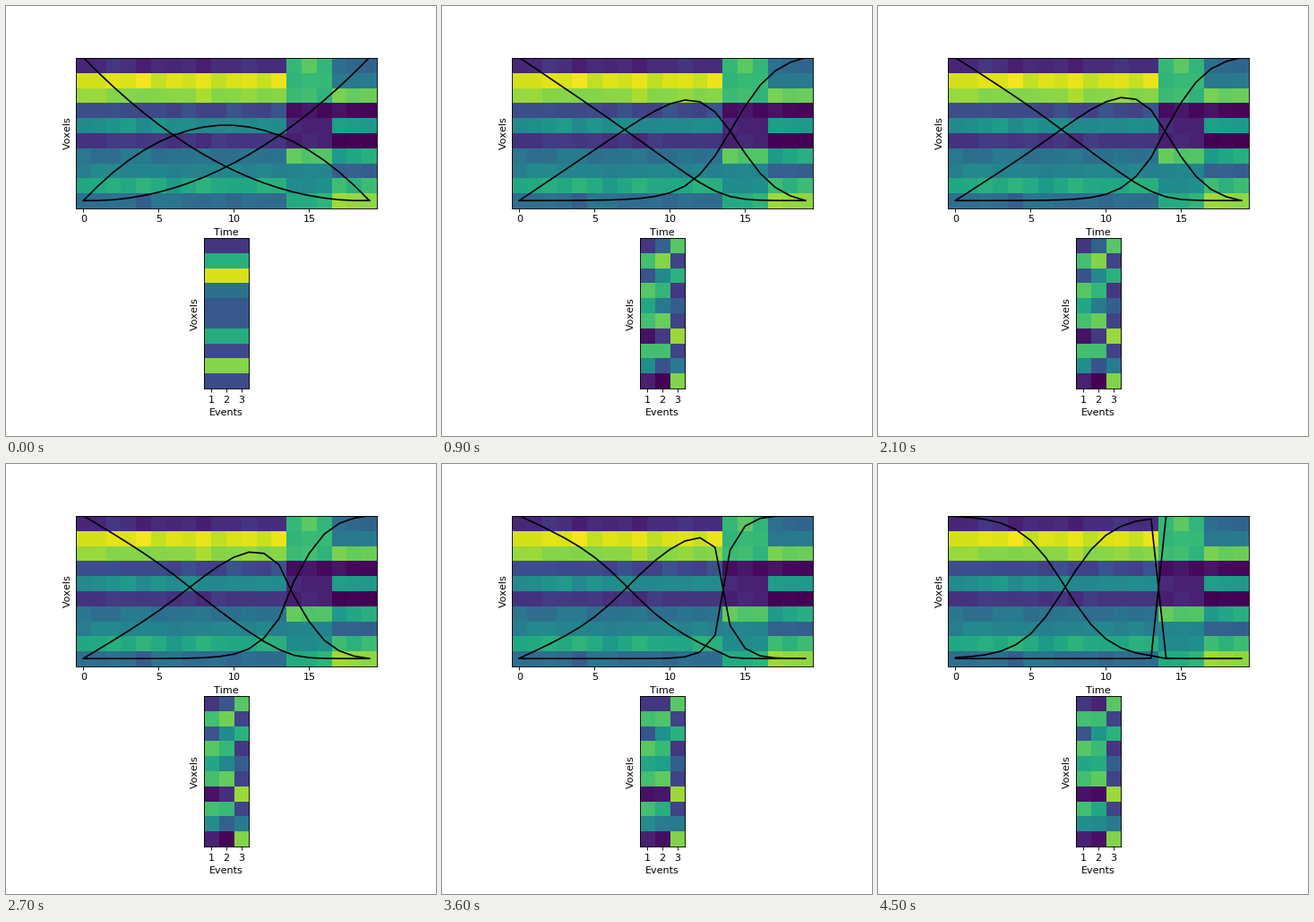
A matplotlib script that plays this animation: 480x480 px, repeating every 5400 ms.

```python
import numpy as np
import matplotlib.pyplot as plt
from matplotlib.animation import FuncAnimation

STEPS = 16          # fitting steps, the last one is held
FRAMES = 18
N_T, N_V = 20, 10
LENGTHS = [14, 3, 3]

# Mean colour level of each voxel in the three stretches of time
MEANS = np.array([
    [.12, .95, .83, .22, .50, .15, .36, .45, .61, .36],
    [.70, .65, .68, .04, .09, .09, .75, .45, .47, .63],
    [.34, .42, .77, .06, .54, .00, .60, .31, .67, .83]])

# Event patterns; the second one changes while the fit settles
START = np.array([.16, .63, .94, .37, .27, .28, .62, .22, .82, .23])
FIRST = np.array([.16, .70, .26, .74, .60, .70, .05, .70, .49, .09])
SECOND = np.array([.32, .82, .47, .66, .40, .77, .17, .70, .25, .00])
SECOND_END = np.array([.10, .69, .53, .68, .62, .75, .03, .60, .48, .05])

time = np.arange(N_T)


def sigmoid(x):
    return 1 / (1 + np.exp(-x))


def smoothstep(x, start, end):
    x = np.clip((x - start) / (end - start), 0, 1)
    return x * x * (3 - 2 * x)


def make_data():
    rng = np.random.default_rng(4)
    data = np.repeat(MEANS.T, LENGTHS, axis=1)
    return np.clip(data + rng.normal(0, .022, data.shape), 0, 1)


def even_odds():
    """First and third event when all pairs of bounds are equally likely."""
    last = N_T - 1
    pairs = last * (last - 1)
    return np.array([(last - time) * (last - 1 - time),
                     time * (time - 1)]) / pairs


def fitted(step):
    """First and third event once the patterns have formed."""
    # The last bound sharpens and locks on to the jump in the data
    steep = .7 + .4 * 3 ** ((step - 11) / 2)
    jump = LENGTHS[0] - .5
    centre = jump + .7 * (.7 / steep) ** 2
    third = sigmoid(steep * (time - centre)
                    + (steep - .7) * np.sign(time - jump))
    third /= third[-1]

    # The first bound goes from a rounded ramp to an S-curve
    ramp = .08 * np.logaddexp(0, (1 - .0715 * time) / .08)
    curve = sigmoid(.68 * (7.3 - time))
    mix = 2 ** ((step - STEPS + 1) / 2)
    first = (ramp + mix * (curve - ramp)) * (1 - third)
    return np.array([first, third])


def curves(step):
    start = even_odds()
    first, third = start + (1 - .25 ** step) * (fitted(step) - start)
    return first, 1 - first - third, third


def patterns(step):
    if step == 0:
        return np.tile(START[:, None], 3)
    mix = smoothstep(step, 6, STEPS - 1)
    second = SECOND + mix * (SECOND_END - SECOND)
    return np.column_stack([FIRST, second, .9 - FIRST])


plt.rcParams["text.kerning_factor"] = 6
fig, (top, bottom) = plt.subplots(2, 1, figsize=(6, 6), dpi=80)
style = dict(cmap="viridis", vmin=0, vmax=1, interpolation="nearest")

top.imshow(make_data(), **style)
lines = [top.plot(time, time * 0, color="black", lw=1.5)[0] for _ in range(3)]
top.set(xlim=(-.5, N_T - .5), ylim=(N_V - .5, -.5), xlabel="Time",
        ylabel="Voxels", xticks=[0, 5, 10, 15], yticks=[])

events = bottom.imshow(patterns(0), **style)
bottom.set(xlabel="Events", ylabel="Voxels", yticks=[])
bottom.set_xticks([0, 1, 2], ["1", "2", "3"])


def draw(frame):
    step = min(frame, STEPS - 1)
    for line, prob in zip(lines, curves(step)):
        line.set_ydata(N_V - 1 - 9.5 * prob)
    events.set_data(patterns(step))
    return [*lines, events]


anim = FuncAnimation(fig, draw, frames=FRAMES, interval=300, repeat=True)
plt.show()
```
